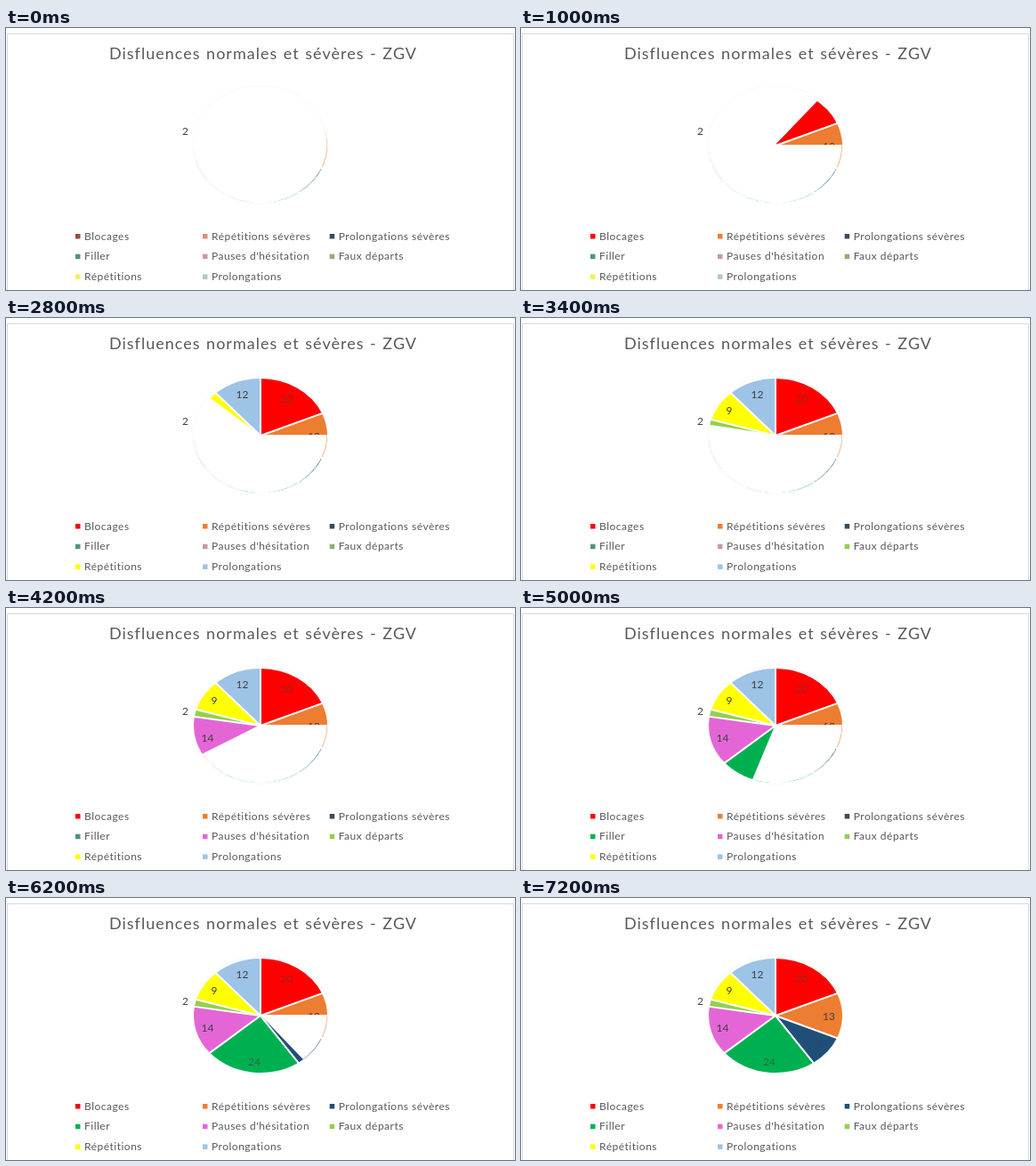
Write an HTML page that moves like this. It is 572 px wide and 294 px high and loops after 7.4 s.

```html
<!DOCTYPE html>
<html lang="fr">
<head>
<meta charset="utf-8">
<style>
  html, body { margin: 0; width: 100%; height: 100%; overflow: hidden; background: #fff; }
  svg { display: block; font: 12px Lato, sans-serif; fill: #595959; }
  .title { font-size: 18px; letter-spacing: 1px; word-spacing: 1px; }
  .legend { letter-spacing: .5px; }
  .value { fill: #404040; text-anchor: middle; }
</style>
</head>
<body>
<svg id="chart" width="572" height="294" viewBox="0 0 572 294">
  <path d="M1.5 294V6.5H570.5V294" fill="none" stroke="#d9d9d9"/>
  <text class="title" x="116" y="34.5">Disfluences normales et sévères - ZGV</text>
  <ellipse cx="285.7" cy="131" rx="76" ry="66.5" fill="none" stroke="#f8fbfb"/>
</svg>
<script>
const STEP_MS = 200, STEPS = 37, DEG_PER_STEP = 10;
const PIE = { x: 286, y: 132, rx: 75, ry: 64 };
const COVER = { x: 285.7, y: 131, rx: 75, ry: 65.2 };

// Clockwise from the top; "muted" is the legend colour before the slice shows.
const slices = [
  { name: 'Blocages', size: 19.5, color: '#ff0000', muted: '#9c4a3c', at: [315.5, 94.5], opacity: .5 },
  { name: 'Répétitions sévères', size: 13.3, color: '#ed7d31', muted: '#dd9070', at: [346, 137] },
  { name: 'Prolongations sévères', size: 9.4, color: '#1f4e79', muted: '#3a4a5c', at: [335, 169], opacity: .4 },
  { name: 'Filler', size: 24.4, color: '#00b050', muted: '#4a9482', at: [279, 187.5], opacity: .6 },
  { name: "Pauses d'hésitation", size: 14.4, color: '#e466d6', muted: '#c99a9e', at: [226.5, 150] },
  { name: 'Faux départs', size: 2.1, color: '#92d050', muted: '#93ac74', at: [201.5, 119.5] },
  { name: 'Répétitions', size: 9.2, color: '#ffff00', muted: '#f0f060', at: [234, 107.5] },
  { name: 'Prolongations', size: 12.2, color: '#9dc3e6', muted: '#b0c8c8', at: [265.5, 89.5] },
];

const svg = document.getElementById('chart');

function add(tag, attrs, text = '') {
  const node = document.createElementNS(svg.namespaceURI, tag);
  for (const key in attrs) node.setAttribute(key, attrs[key]);
  node.textContent = text;
  return svg.appendChild(node);
}

// Sector of an ellipse, angles in degrees counterclockwise from the right.
function sector({ x, y, rx, ry }, from, to) {
  const point = deg => {
    const a = deg * Math.PI / 180;
    return `${x + rx * Math.cos(a)} ${y - ry * Math.sin(a)}`;
  };
  const large = to - from > 180 ? 1 : 0;
  return `M${x} ${y}L${point(from)}A${rx} ${ry} 0 ${large} 0 ${point(to)}Z`;
}

const total = slices.reduce((sum, s) => sum + s.size, 0);
let angle = 90;
for (const s of slices) {
  const end = angle - s.size / total * 360;
  add('path', { d: sector(PIE, end, angle), fill: s.color });
  s.edge = angle;
  s.start = end < 0 && angle > 0 ? 0 : (end + 360) % 360;
  angle = end;
}
for (const s of slices) {
  const a = s.edge * Math.PI / 180;
  add('path', {
    d: `M${PIE.x} ${PIE.y}l${77 * Math.cos(a)} ${-66 * Math.sin(a)}`,
    stroke: '#fff', 'stroke-width': 2,
  });
}
for (const { size, at: [x, y], opacity = 1 } of slices) {
  add('text', { class: 'value', x, y, opacity }, Math.round(size));
}

const cover = add('path', { fill: '#fff' });

slices.forEach((s, i) => {
  const x = [78, 221, 363.7][i % 3];
  const row = Math.floor(i / 3);
  s.key = add('rect', { x, y: 231 + row * 22.7, width: 5.5, height: 5.5 });
  add('text', { class: 'legend', x: x + 10, y: 237.5 + row * 22.7 }, s.name);
});

function draw(now) {
  const sweep = Math.floor(now / STEP_MS) % STEPS * DEG_PER_STEP;
  cover.setAttribute('d', sweep < 360 ? sector(COVER, Math.max(sweep, .01), 360) : '');
  for (const s of slices) s.key.setAttribute('fill', sweep > s.start ? s.color : s.muted);
  requestAnimationFrame(draw);
}
draw(0);
</script>
</body>
</html>
```
